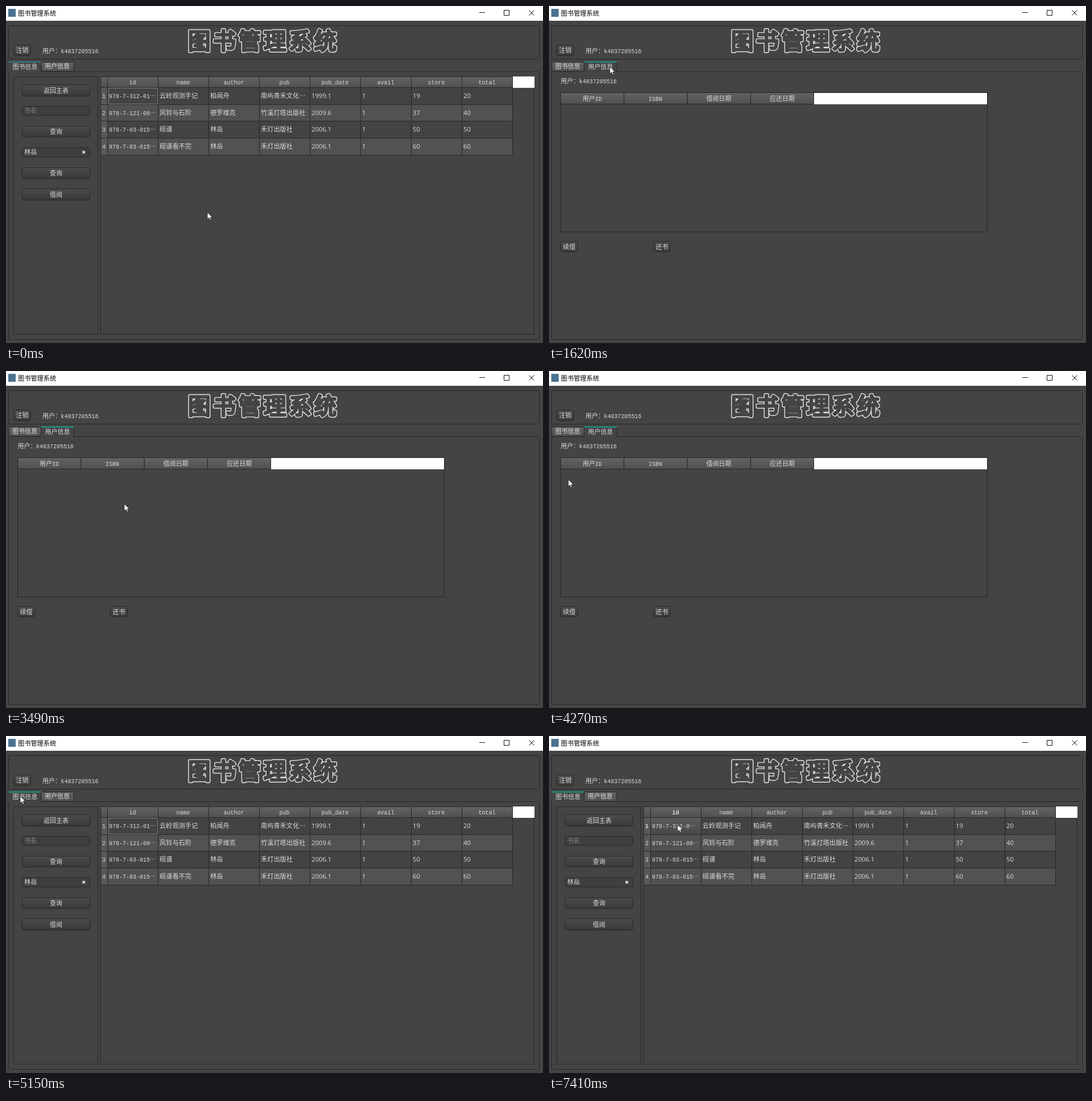
Recreate the animation shown at these times as an HTML page. Size 944 by 593 pixels, loop 8 s.

```html
<!DOCTYPE html>
<html lang="zh-CN">
<head>
<meta charset="utf-8">
<style>
html, body { margin: 0; width: 100%; height: 100%; overflow: hidden; background: #444; }
svg { display: block; width: 944px; height: 593px; }
text { fill: #dcdcdc; white-space: pre; }
.cjk { font: 11px "Noto Sans CJK SC", "Noto Sans CJK", sans-serif; }
.mono { font: 10px "Liberation Mono", "Noto Sans CJK SC", "Noto Sans CJK", monospace; }
.cell { font: 11.2px "Open Sans", "Noto Sans CJK SC", "Noto Sans CJK", sans-serif; }
.title { font: 39.5px "Noto Sans CJK SC", "Noto Sans CJK", sans-serif; letter-spacing: 4.8px; stroke-linejoin: round; }
.outer { fill: #e4e4e4; stroke: #e4e4e4; stroke-width: 6.4px; }
.inner { fill: #444; stroke: #444; stroke-width: 3.6px; }
.bold { font-weight: bold; }
.dim { fill: #858585; }
.black { fill: #000; }
.mid { text-anchor: middle; }
</style>
</head>
<body>
<svg id="stage" viewBox="0 0 944 593">
  <defs>
    <linearGradient id="btn" x2="0" y2="1"><stop stop-color="#4b4b4b"/><stop offset="1" stop-color="#393939"/></linearGradient>
    <linearGradient id="hot" x2="0" y2="1"><stop stop-color="#5c5c5c"/><stop offset="1" stop-color="#484848"/></linearGradient>
    <linearGradient id="head" x2="0" y2="1"><stop stop-color="#636363"/><stop offset="1" stop-color="#505050"/></linearGradient>
  </defs>
  <g id="scene"></g>
  <path id="cursor" d="M0 0V12.2L2.9 9.6 4.8 14 6.8 13.1 4.9 8.9H9Z" fill="#fff" stroke="#111" stroke-width=".7"/>
</svg>
<script>
const LOOP = 8000, EDGE = '#282828', TEAL = '#10b5a0', BLUE = '#2b8fae';
const USER = 'k4837205516', AUTHOR = '林岳', TITLE = '图书管理系统';
const TO_USER = 1620, TO_BOOKS = 5150, SELECT = 7410;

const HEADS = ['id', 'name', 'author', 'pub', 'pub_date', 'avail', 'store', 'total'];
const ROWS = [
  ['978-7-312-01⋯', '云岭观测手记', '柏闻舟', '南屿青禾文化⋯', '1999.1', 1, 19, 20],
  ['978-7-121-08⋯', '风铃与石阶', '德罗维克', '竹溪灯塔出版社', '2009.6', 1, 37, 40],
  ['978-7-03-015⋯', '砚谱', AUTHOR, '禾灯出版社', '2006.1', 1, 50, 50],
  ['978-7-03-015⋯', '砚谱看不完', AUTHOR, '禾灯出版社', '2006.1', 1, 60, 60]
];
const ROW_Y = [143.5, 173.5, 202.5, 232.5, 262.5];
const colX = i => 178.5 + 89 * i;

// Pointer moves: first step time, last step time, step count, [step, x, y] keys
const MOVES = [
  [150, 840, 10, [[0, 354, 363], [6, 190, 210], [8, 142, 150], [10, 107, 107]]],
  [2470, 3250, 11, [[0, 107, 107], [3, 190, 180], [6, 273, 234], [7, 280, 239], [11, 148, 212]]],
  [3340, 3560, 4, [[0, 148, 212], [4, 228, 241]]],
  [3880, 4680, 11, [[0, 228, 241], [1, 215, 244], [6, 34, 191], [8, 22, 160], [11, 27, 121]]],
  [4760, 4920, 3, [[0, 27, 121], [3, 25, 106]]],
  [6250, 6250, 1, [[0, 25, 106], [1, 24, 106]]],
  [6630, 7410, 11, [[0, 24, 106], [4, 90, 110], [8, 185, 145], [11, 226, 156]]]
];

function pointer(t) {
  let [, x, y] = MOVES[0][3][0];
  for (const [start, end, count, keys] of MOVES) {
    if (t < start) break;
    const gap = (end - start) / (count - 1) || 1;
    // Steps fall on whole 10 ms ticks, so one may come a little early
    const step = Math.min(count, Math.floor((t - start) / gap + .15) + 1);
    const i = keys.findIndex(k => k[0] >= step), a = keys[i - 1], b = keys[i];
    const p = (step - a[0]) / (b[0] - a[0]);
    x = Math.round(a[1] + (b[1] - a[1]) * p);
    y = Math.round(a[2] + (b[2] - a[2]) * p);
  }
  return [x, y];
}

const text = (x, y, s, cls = 'cjk') => `<text x="${x}" y="${y}" class="${cls}">${s}</text>`;
const box = (x, y, w, h, fill = 'none', stroke = EDGE, r = 0) =>
  `<rect x="${x}" y="${y}" width="${w}" height="${h}" rx="${r}" fill="${fill}" stroke="${stroke}"/>`;
const line = (d, color = EDGE, w = 1) => `<path d="${d}" fill="none" stroke="${color}" stroke-width="${w}"/>`;
const button = (x, y, w, h, s, hot) =>
  box(x + .5, y + .5, w - 1, h - 1, `url(#${hot ? 'hot' : 'btn'})`, EDGE, 3) +
  text(x + w / 2, y + h / 2 + 4, s, 'cjk mid');
const field = (y, s, cls) => box(28.5, y + .5, 119, 16, '#3f3f3f', EDGE, 2) + text(32, y + 12, s, cls);
const user = (x, y) => text(x, y, '用户：') + text(x + 32.5, y - .5, USER, 'mono');

function frame() {
  return box(0, 0, 944, 26, '#fff', 'none') + box(4, 5, 13, 14, '#4b7391', 'none') +
    text(21, 16.5, TITLE, 'cell black') +
    line('M832 11.5H842M875.5 7.5H884.5V16.5H875.5ZM919.5 7.5L928.5 16.5M928.5 7.5L919.5 16.5', '#111') +
    box(4.5, 34.5, 933, 59, 'none', EDGE, 2) +
    text(320, 75.5, TITLE, 'title outer') + text(320, 75.5, TITLE, 'title inner') +
    button(13, 68, 31, 20, '注销') + user(64, 83) +
    box(4.5, 115.5, 933, 471, 'none', EDGE, 1);
}

function tab(x, w, s, selected, hover, color) {
  const open = selected || hover;
  return box(x, 98.5, w, 16.5, open ? '#444' : 'url(#head)', open ? 'none' : EDGE) +
    (selected ? line(`M${x} 115.5H${x + w}`, '#444') : '') +
    (open ? line(`M${x + w + .5} 99V115`) + line(`M${x} 98.5H${x + w + .5}`, color, 1.6) : '') +
    text(x + (open ? 6.5 : 6), open ? 111 : 110, s);
}

function books(t, mx, my) {
  const inside = (x, y, w, h) => mx >= x && mx < x + w && my >= y && my < y + h;
  const selected = t >= SELECT;
  const wide = (y, h, s) => button(28, y, 120, h, s, inside(28, y, 120, h));
  let out = box(13.5, 124.5, 148, 453, 'none', EDGE, 1) +
    wide(138, 21, '返回主表') + field(176, '书名', 'cjk dim') + wide(211, 20, '查询') +
    field(249, AUTHOR, 'cell') + line('M134.5 255L139 259.5M139 255L134.5 259.5', '#fff', 1.6) +
    wide(284, 20, '查询') + wide(321, 21, '借阅') +
    box(166.5, 124.5, 762, 453) + box(166.5, 124.5, 12, 19, 'url(#head)');
  HEADS.forEach((s, c) => {
    out += box(colX(c), 124.5, 89, 19, 'url(#head)') +
      text(colX(c) + 44, 137.5, s, 'mono mid' + (selected && !c ? ' bold' : ''));
  });
  ROWS.forEach((row, r) => {
    const y = ROW_Y[r], h = ROW_Y[r + 1] - y;
    out += box(166.5, y, 12, h, '#595959') +
      text(172, y + 18, r + 1, 'mono mid' + (selected && !r ? ' bold' : ''));
    row.forEach((s, c) => {
      const x = colX(c), hover = inside(x, y, 89, h), first = !r && !c;
      const fill = hover ? 'url(#hot)' : r % 2 ? '#525252' : '#434343';
      out += box(x, y, 89, h, fill);
      if (first && !selected) out += box(x + 2, y + 1, 86, h - 2, 'none', '#858585');
      if (first && hover) s = s.replace('1⋯', '⋯');
      out += text(x + 2.5, y + (c ? 18.5 : 18), s, c ? 'cell' : 'mono');
    });
  });
  return out + box(891.5, 124.5, 37, 19, '#fff', '#fff');
}

function loans() {
  let out = user(20.5, 136) + box(20.5, 152.5, 750, 245);
  for (let i = 0; i < 4; i++) out += box(20.5 + 111.3 * i, 152.5, 111.3, 20, 'url(#head)');
  return out + box(466.5, 153.5, 303, 19, '#fff', '#fff') +
    text(59, 167, '用户') + text(81, 166.5, 'ID', 'mono') + text(187, 166.5, 'ISBN', 'mono mid') +
    text(298.5, 167, '借阅日期', 'cjk mid') + text(410, 167, '应还日期', 'cjk mid') +
    button(20, 414, 31, 19, '续借') + button(183, 414, 31, 19, '还书');
}

const scene = document.getElementById('scene'), cursor = document.getElementById('cursor');
const fixed = frame();
let shown = '';

function draw(now) {
  const t = now % LOOP, [x, y] = pointer(t);
  const onUser = t >= TO_USER && t < TO_BOOKS;
  const over = (a, b) => x >= a && x < b && y >= 98 && y < 115;
  const picture = fixed +
    tab(5, 56.5, '图书信息', !onUser, over(5, 62), t < TO_USER ? BLUE : TEAL) +
    tab(62, 57, '用户信息', onUser, over(62, 120), TEAL) +
    (onUser ? loans() : books(t, x, y));
  if (picture !== shown) scene.innerHTML = shown = picture;
  cursor.setAttribute('transform', `translate(${x} ${y})`);
}

const begin = performance.now();
function tick() {
  draw(performance.now() - begin);
  requestAnimationFrame(tick);
}
tick();
</script>
</body>
</html>
```
